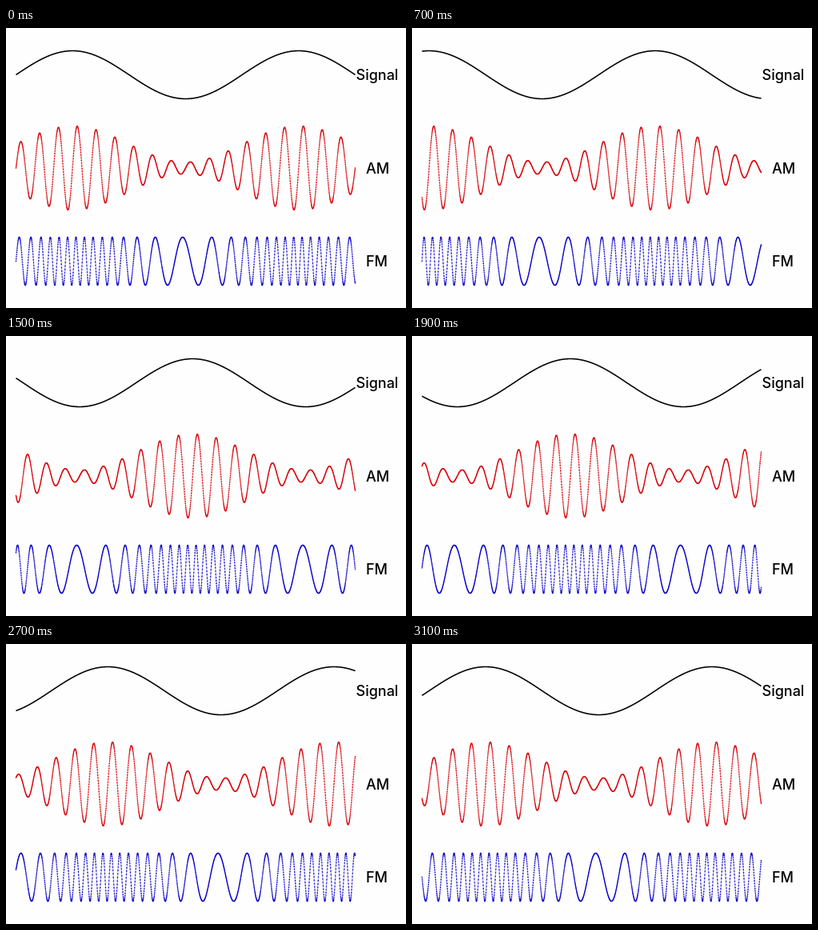
Write an HTML page with a canvas that moves like this. It is 500 px wide and 350 px high and loops after 3200 ms.

```html
<!DOCTYPE html>
<html lang="en">
<head>
<meta charset="utf-8">
<title>Amplitude and frequency modulation</title>
<style>
  html, body { margin: 0; width: 100%; height: 100%; overflow: hidden; background: #fefefe; }
  canvas { display: block; }
</style>
</head>
<body>
<canvas id="stage" width="500" height="350"></canvas>
<script>
  const LEFT = 12.5, RIGHT = 436.5, PERIOD = 848 / 3;
  const LOOP = 3200, STEPS = 32, TAU = 2 * Math.PI;
  const { sin, cos, floor } = Math;
  const ctx = document.getElementById('stage').getContext('2d');

  const waves = [
    { color: '#000', mid: 58.5, line: 1.6, dot: 0, level: a => 30 * sin(a) },
    { color: '#d80008', mid: 175, line: .5, dot: 1.35,
      level: a => 30 * (1 + .75 * sin(a)) * sin(12 * a) },
    { color: '#0800c8', mid: 291.5, line: .4, dot: 1.35,
      level: a => 30 * sin(17 * a + 10 * (1 - cos(a))) }
  ];

  const labels = [['Signal', 437.5, 65], ['AM', 450, 182], ['FM', 450, 298]];

  // A fine line carries evenly spaced dots, so steep parts look lighter.
  function drawWave({ color, mid, line, dot, level }, phase) {
    const curve = new Path2D(), dots = new Path2D();
    for (let x = LEFT; x <= RIGHT; x += .25) {
      const y = mid - level(TAU * (x - LEFT) / PERIOD + phase);
      curve.lineTo(x, y);
      dots.rect(x - dot / 2, y - dot / 2, dot, dot);
    }
    ctx.strokeStyle = ctx.fillStyle = color;
    ctx.lineWidth = line;
    ctx.stroke(curve);
    if (dot) ctx.fill(dots);
  }

  function draw(step) {
    ctx.fillStyle = '#fefefe';
    ctx.fillRect(0, 0, 500, 350);
    for (const wave of waves) drawWave(wave, TAU * step / STEPS);
    ctx.fillStyle = '#000';
    ctx.font = '500 18px Inter, Arial, sans-serif';
    for (const label of labels) ctx.fillText(...label);
  }

  const start = performance.now();
  let shown = 0;
  function tick() {
    const step = floor((performance.now() - start) % LOOP / LOOP * STEPS);
    if (step !== shown) draw(shown = step);
    requestAnimationFrame(tick);
  }
  draw(0);
  tick();
</script>
</body>
</html>
```
